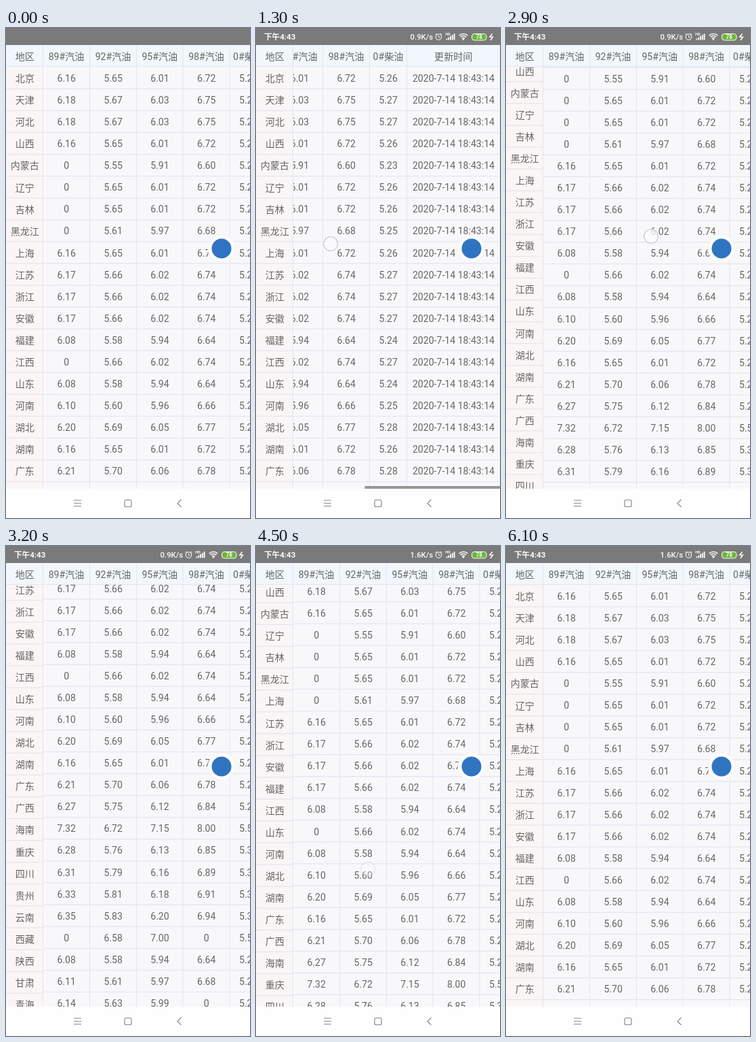
An HTML page with a canvas for the animation above (6.7 s loop, 360 by 720 pixels).

```html
<!DOCTYPE html>
<html lang="zh-CN">
<head>
<meta charset="utf-8">
<title>油价表</title>
<style>
html, body { margin: 0; width: 100%; height: 100%; overflow: hidden; background: #fff; }
canvas { display: block; }
</style>
</head>
<body>
<canvas id="stage" width="360" height="720"></canvas>
<script>
const ctx = document.getElementById('stage').getContext('2d');
const LOOP = 6700, STEP = 100, LAG = 25;
const TOP = 57, BOTTOM = 677, LEFT = 54.5, PITCH = 32.07;
const MAX_X = 162.5, MAX_Y = 374.7;
const FONT = 'Roboto, "Noto Sans CJK SC", "Noto Sans CJK", sans-serif';
const INK = '#666', GRID = '#e4e4f0', PALE = '#fafafa', HEAD = '#f1f7fc';

// Regions with the price of 92# petrol; the other grades follow from it.
const regions = ('北京 5.65,天津 5.67,河北 5.67,山西 5.65,内蒙古 5.55,辽宁 5.65,吉林 5.65,黑龙江 5.61,' +
  '上海 5.65,江苏 5.66,浙江 5.66,安徽 5.66,福建 5.58,江西 5.66,山东 5.58,河南 5.60,湖北 5.69,湖南 5.65,' +
  '广东 5.70,广西 5.75,海南 6.72,重庆 5.76,四川 5.79,贵州 5.81,云南 5.83,西藏 6.58,陕西 5.58,甘肃 5.61,' +
  '青海 5.63,宁夏 5.60,新疆 5.48').split(',').map(entry => {
    const [name, price] = entry.split(' ');
    return { name, price: Number(price) };
  });

const grade = (ratio, base = 0, missing = '') => ({ name, price }) =>
  missing.includes(name) ? '0' : (price * ratio + base).toFixed(2);

let edge = LEFT;
const columns = [
  ['89#汽油', 69, grade(1.09, 0, '内蒙古辽宁吉林黑龙江西藏新疆')],
  ['92#汽油', 69, grade(1)],
  ['95#汽油', 68.5, grade(1.064)],
  ['98#汽油', 69, grade(1.19, 0, '西藏青海')],
  ['0#柴油', 55, grade(.3, 3.57)],
  ['更新时间', 137.5, () => '2020-7-14 18:43:14']
].map(([title, width, value]) => {
  edge += width;
  return { title, value, right: edge, center: edge - width / 2 };
});

const clamp = v => Math.min(1, Math.max(0, v));
const ease = (t, start, end) => (1 - Math.cos(Math.PI * clamp((t - start) / (end - start)))) / 2;
const mix = (a, b, u) => a + (b - a) * u;

const scrollX = t => MAX_X * (ease(t, 650, 1200) - ease(t, 1605, 2158));
const scrollY = t => 300 * ease(t, 2650, 3203) + (MAX_Y - 300) * ease(t, 3400, 3850) -
  MAX_Y * ease(t, 4215, 4615);

const swipe = (start, end, from, to) => ({ start, end, from, to });
const swipes = [
  swipe(650, 1550, [300, 322], [69, 316]),
  swipe(1600, 2170, [145, 320], [321, 327.6]),
  swipe(2600, 3150, [217, 442], [212, 204]),
  swipe(3400, 3850, [208, 330], [206, 250]),
  swipe(4150, 4540, [206.6, 237.6], [164, 481]),
  swipe(5700, 6050, [284.5, 636], [284.5, 641])
];

function rect(x, y, w, h, color) {
  ctx.fillStyle = color;
  ctx.fillRect(x, y, w, h);
}

function text(str, x, y, size = 14.1, color = INK, align = 'center', weight = 400) {
  ctx.font = `${weight} ${size}px ${FONT}`;
  ctx.textAlign = align;
  ctx.fillStyle = color;
  ctx.fillText(str, x, y);
}

function circle(x, y, r, fill, stroke) {
  ctx.beginPath();
  ctx.arc(x, y, r, 0, Math.PI * 2);
  if (fill) { ctx.fillStyle = fill; ctx.fill(); }
  if (stroke) { ctx.strokeStyle = stroke; ctx.stroke(); }
}

function polyline(points, color, width = 1) {
  ctx.beginPath();
  points.forEach(([x, y]) => ctx.lineTo(x, y));
  ctx.strokeStyle = color;
  ctx.lineWidth = width;
  ctx.stroke();
}

function clipped(x, y, w, h, color, paint) {
  ctx.save();
  ctx.beginPath();
  ctx.rect(x, y, w, h);
  ctx.clip();
  rect(x, y, w, h, color);
  paint();
  ctx.restore();
}

function eachRow(shift, paint) {
  regions.forEach((region, i) => {
    const y = TOP + i * PITCH - shift;
    if (y > TOP - PITCH && y < BOTTOM) paint(region, y);
  });
}

function drawBody(sx, sy) {
  clipped(LEFT, TOP, 360 - LEFT, BOTTOM - TOP, '#f8f8fa', () => {
    columns.forEach(c => rect(c.right - sx - .5, TOP, 1, BOTTOM - TOP, GRID));
    eachRow(sy, (region, y) => {
      rect(LEFT, y + PITCH - .3, 360, 1.2, GRID);
      columns.forEach(c => text(c.value(region), c.center - sx + .2, y + 22));
    });
  });
}

function drawRegions(sy) {
  clipped(0, TOP, LEFT, BOTTOM - TOP, '#faf6f5', () => {
    eachRow(sy, ({ name }, y) => {
      rect(0, y + PITCH - .3, LEFT, 1.2, GRID);
      text(name, 27.8, y + 22.2);
    });
  });
  rect(LEFT - .5, TOP, 1, BOTTOM - TOP, GRID);
}

function drawHeader(sx) {
  clipped(0, 25, 360, TOP - 25, HEAD, () => {
    columns.forEach(c => {
      rect(c.right - sx - .5, 25, 1, 32, GRID);
      text(c.title, c.center - sx, 46.8);
    });
    rect(0, 25, LEFT, 32, HEAD);
    text('地区', 27.8, 46.8);
    rect(LEFT - .5, 25, 1, 32, GRID);
    rect(0, 56, 360, 1, GRID);
  });
}

function drawScrollbar(t, sx) {
  const view = 360 - LEFT, ratio = view / (edge - LEFT);
  ctx.globalAlpha = clamp((t - 650) / 50) * clamp((2300 - t) / 100);
  rect(LEFT + sx * ratio, 673, view * ratio, 4, '#979797');
  ctx.globalAlpha = 1;
}

function drawStatus(t) {
  rect(0, 0, 360, 25, '#7a7a7a');
  if (t < 400) return;
  text('下午4:43', 12, 17, 11.6, PALE, 'left', 600);
  text(t < 4500 ? '0.9K/s' : '1.6K/s', 261, 17, 11.3, PALE, 'right', 500);

  ctx.lineWidth = 1.1;
  circle(269.5, 13.2, 4.2, null, PALE);
  polyline([[269.5, 10.8], [269.5, 13.5], [271.5, 14]], PALE);
  polyline([[264.5, 10], [267, 8]], PALE);
  polyline([[272, 8], [274.5, 10]], PALE);

  text('HD', 283, 11, 5.5, PALE, 'center', 700);
  for (let i = 0; i < 5; i++) rect(280.5 + i * 2.8, 15.5 - i * 1.8, 1.9, 2 + i * 1.8, PALE);

  ctx.lineWidth = 1.5;
  for (let r = 3; r <= 9; r += 3) {
    ctx.beginPath();
    ctx.arc(306, 17.5, r, -Math.PI * .75, -Math.PI * .25);
    ctx.stroke();
  }
  circle(306, 16.8, 1.2, PALE);

  ctx.beginPath();
  ctx.roundRect(318.5, 8.5, 21.5, 9.5, 4);
  ctx.fillStyle = '#6cb636';
  ctx.fill();
  ctx.lineWidth = 1.1;
  ctx.stroke();
  text('78', 329.2, 16.3, 8.2, PALE, 'center', 700);
  polyline([[348.5, 8.5], [345, 13.2], [349.3, 13.2], [346, 18]], PALE, 1.6);
}

function drawNav() {
  const gray = '#888';
  rect(0, BOTTOM, 360, 720 - BOTTOM, '#fefefe');
  for (let i = 0; i < 3; i++) polyline([[100, 694 + i * 4.3], [111, 694 + i * 4.3]], gray);
  ctx.beginPath();
  ctx.roundRect(175, 693.5, 10, 10, 2);
  ctx.lineWidth = 1.2;
  ctx.stroke();
  polyline([[258.5, 693], [253, 698.4], [258.5, 703.8]], gray, 1.2);
}

function drawBubble() {
  ctx.lineWidth = 1;
  circle(318, 324, 20, '#fefefe', '#f2f2f5');
  circle(318, 324, 14.5, '#2f74c0');
}

function drawTouch(t) {
  const active = swipes.find(s => t >= s.start && t < s.end);
  if (!active) return;
  const { start, end, from, to } = active;
  const [x, y] = from.map((v, i) => mix(v, to[i], ease(t, start, end)));
  ctx.globalAlpha = clamp((end - t) / 100);
  ctx.lineWidth = 1.2;
  circle(x, y, 10.3, 'rgba(252,252,254,.75)', '#cbcbd6');
  ctx.globalAlpha = 1;
}

function draw(t) {
  const sx = scrollX(t);
  drawBody(sx, scrollY(t));
  drawRegions(scrollY(t - LAG));
  drawHeader(scrollX(t - LAG));
  drawScrollbar(t, sx);
  drawNav();
  drawStatus(t);
  drawBubble();
  drawTouch(t);
}

function tick() {
  draw(Math.floor(performance.now() % LOOP / STEP) * STEP);
  requestAnimationFrame(tick);
}
tick();
</script>
</body>
</html>
```
